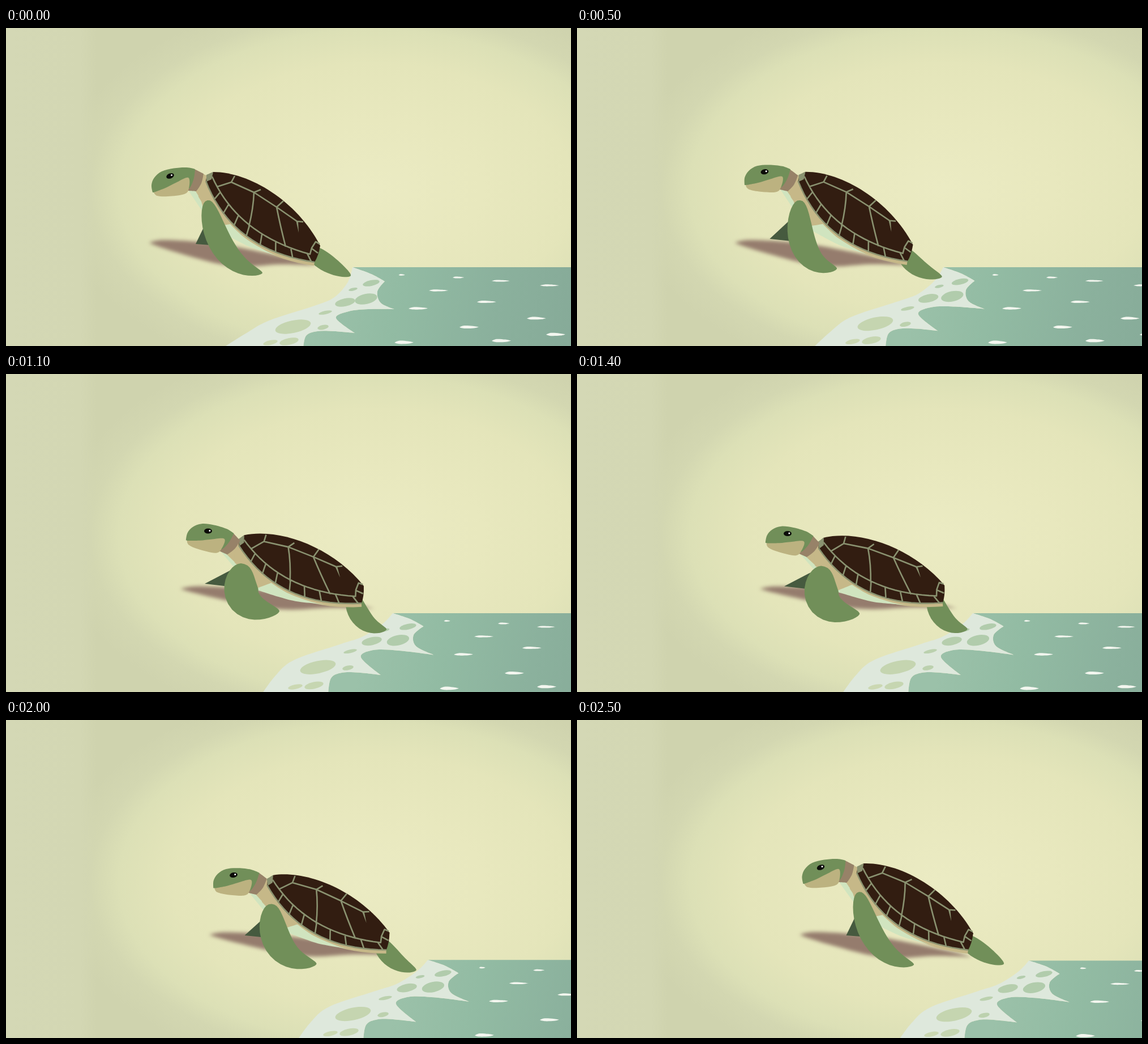
Recreate the animation shown at these times as an HTML page with a canvas. Size 998 by 561 pixels, loop 2600 ms.

```html
<!DOCTYPE html>
<html lang="en">
<head>
<meta charset="utf-8">
<title>Turtle on the beach</title>
<style>
  html, body { margin: 0; width: 100%; height: 100%; overflow: hidden; background: #d3d7b3; }
  canvas { display: block; width: 100vw; height: 100vh; }
</style>
</head>
<body>
<canvas id="stage" width="998" height="561"></canvas>
<script>
const LOOP = 2600, STEP = 100;
const ctx = document.getElementById('stage').getContext('2d');
const GREEN = '#718f59', TAN = '#c6b888', PALE = '#d0e4bf', DARK = '#321d11', SEAM = '#8a9270';

// ---- gait ----
// time, sea x, body x, body y, lean in degrees, step along POSES
const KEYS = [
  [0, 0, 367, 255, 0, 0],
  [300, 25, 392, 254, 0, 0],
  [700, 54, 414, 259, -2, 1],
  [1100, 80, 422, 285, -11.5, 2],
  [1400, 96, 437, 289.5, -13, 2],
  [2000, 142, 473, 274.5, -8.2, 2.5],
  [2500, 195, 507.5, 254, -2, 3]
];
// head: eye and tilt; far: triangle, both from the body; limbs: bend and tip from their root, half width
const PUSH = {
  head: [-77, 6, 0], arm: [18, 118, 97, 128, 21], leg: [37, 32, 77, 49, 16],
  far: [-32, 126, -17, 95, -7, 128]
};
const REACH = {
  head: [-68, -10, 22], arm: [-47, 116, 26, 111, 26], leg: [8, 58, 71, 56, 17],
  far: [-104, 106, -33, 61, -56, 112]
};
const CROUCH = {
  head: [-65, -8, 20.5], arm: [-28, 85, 62, 83, 30], leg: [10, 66, 62, 68, 18],
  far: [-71, 85, -25, 61, -28, 90]
};
const POSES = [PUSH, REACH, CROUCH, PUSH];
const NECK = [367, 255], EYE = [289, 261], SHOULDER = [356, 304], HIP = [532, 388];

// ---- helpers ----
const clamp = (v, lo = 0, hi = 1) => Math.max(lo, Math.min(hi, v));
const mix = (a, b, k) => a.map((v, i) => v + (b[i] - v) * k);
const shift = (p, dx, dy) => p.map((v, i) => v + (i % 2 ? dy : dx));
const quad = (a, c, b, u) => mix(mix(a, c, u), mix(c, b, u), u);

// Smooth curve through the key rows
function gait(t) {
  const last = KEYS.length - 1;
  let i = 0;
  while (i < last - 1 && t >= KEYS[i + 1][0]) i++;
  const a = KEYS[i], b = KEYS[i + 1], h = b[0] - a[0];
  const u = clamp((t - a[0]) / h), u2 = u * u, u3 = u2 * u;
  const slope = (j, c) => {
    const lo = KEYS[Math.max(0, j - 1)], hi = KEYS[Math.min(last, j + 1)];
    return (hi[c] - lo[c]) / (hi[0] - lo[0]) * h;
  };
  return a.map((v, c) => v * (2 * u3 - 3 * u2 + 1) + slope(i, c) * (u3 - 2 * u2 + u)
    + b[c] * (3 * u2 - 2 * u3) + slope(i + 1, c) * (u3 - u2));
}

// Move points from a rest pivot to [x, y, degrees]
function place(p, pivot, [x, y, deg]) {
  const r = deg * Math.PI / 180, c = Math.cos(r), s = Math.sin(r), out = [];
  for (let i = 0; i < p.length; i += 2) {
    const dx = p[i] - pivot[0], dy = p[i + 1] - pivot[1];
    out.push(x + dx * c - dy * s, y + dx * s + dy * c);
  }
  return out;
}
function within(pivot, [x, y, deg], paint) {
  ctx.save();
  ctx.translate(x, y);
  ctx.rotate(deg * Math.PI / 180);
  ctx.translate(-pivot[0], -pivot[1]);
  paint();
  ctx.restore();
}
function fill(color) {
  ctx.fillStyle = color;
  ctx.fill();
}
function line(p) {
  ctx.moveTo(p[0], p[1]);
  for (let i = 2; i < p.length; i += 2) ctx.lineTo(p[i], p[i + 1]);
}
function poly(p, color) {
  ctx.beginPath();
  line(p);
  fill(color);
}
// Rounded closed shape; the listed points stay sharp
function blob(p, color, sharp = []) {
  const n = p.length / 2;
  const at = (i, c) => p[2 * ((i + n) % n) + c];
  const pull = (i, c) => sharp.includes(i % n) ? 0 : (at(i + 1, c) - at(i - 1, c)) / 6;
  ctx.beginPath();
  ctx.moveTo(p[0], p[1]);
  for (let i = 0; i < n; i++) {
    ctx.bezierCurveTo(at(i, 0) + pull(i, 0), at(i, 1) + pull(i, 1),
      at(i + 1, 0) - pull(i + 1, 0), at(i + 1, 1) - pull(i + 1, 1), at(i + 1, 0), at(i + 1, 1));
  }
  fill(color);
}
function oval(x, y, rx, ry, deg, color) {
  ctx.beginPath();
  ctx.ellipse(x, y, rx, ry, deg * Math.PI / 180, 0, 7);
  fill(color);
}
function stops(g, list) {
  list.forEach(([k, c]) => g.addColorStop(k, c));
  return g;
}
// Flipper: a bent spine, broad in the middle and thin at the tip
function limb([x, y], [bx, by, tx, ty, width]) {
  const root = [x, y], bend = [x + bx, y + by], tip = [x + tx, y + ty];
  const near = [], far = [], n = 24;
  for (let i = 0; i <= n; i++) {
    const u = (1 - Math.cos(Math.PI * i / n)) / 2;
    const [px, py] = quad(root, bend, tip, u);
    const [dx, dy] = mix([bx, by], [tx - bx, ty - by], u);
    const w = width * Math.max(0, Math.sin(Math.PI * u ** .7)) ** .6 / Math.hypot(dx, dy);
    near.push(px - dy * w, py + dx * w);
    far.unshift(px + dy * w, py - dx * w);
  }
  poly([...near, ...far], GREEN);
}

// ---- beach ----
const FOAM = [612, 422, 645, 434, 669, 447, 656, 465, 662, 485, 686, 496, 640, 496, 605, 500, 583, 512,
  616, 538, 580, 535, 550, 535, 530, 543, 525, 566, 380, 566, 425, 538, 465, 516, 545, 490, 580, 475, 604, 448];
const HOLES = [[507, 527, 32, 11], [500, 553, 17, 6], [467, 555, 13, 4], [560, 528, 10, 4], [564, 502, 12, 3],
  [599, 484, 18, 7], [636, 478, 20, 9], [645, 450, 15, 5], [613, 461, 8, 2.5]];
const GLINTS = [[799, 440], [874, 446], [960, 454], [699, 435.5], [764, 463], [849, 483], [728, 494.5],
  [937, 512], [818, 527.5], [971, 540.5], [703, 554.5], [875, 551.5]];

// Foam slides back along the sand as the wave draws out
function wash(x, y, k) {
  const pull = k * clamp((x - 380) / 60) * clamp((690 - x) / 80);
  return [x - 27 * pull * clamp((y - 422) / 70), y - 13 * pull * Math.sin(Math.PI * (y - 422) / 144)];
}

function drawSky() {
  ctx.save();
  ctx.translate(648, 285);
  ctx.scale(1, .63);
  ctx.fillStyle = stops(ctx.createRadialGradient(0, 0, 0, 0, 0, 560), [[0, '#ebebc3'], [.34, '#e8e8be'],
    [.63, '#e4e5ba'], [.8, '#dce0b6'], [.89, '#d3d7b1'], [1, '#cfd3ae']]);
  ctx.fillRect(-650, -460, 1002, 905);
  ctx.restore();
  ctx.fillStyle = stops(ctx.createLinearGradient(0, 0, 160, 0),
    [[0, '#d4d8b5'], [.82, '#d3d7b3'], [1, 'rgba(211,215,179,0)']]);
  ctx.fillRect(0, 0, 160, 561);
}

function drawShore(t, sx) {
  const k = clamp(t / 900), fx = sx - 9 * k, dy = Math.max(0, t - 1400) * .0022;
  const foam = [];
  for (let i = 0; i < FOAM.length; i += 2) foam.push(...wash(FOAM[i], FOAM[i + 1], k));
  const edge = shift(foam, fx, dy);

  const paint = stops(ctx.createLinearGradient(560 + sx, 440, 1010 + sx, 540),
    [[0, '#9bc1a9'], [.3, '#92bba3'], [.65, '#8bb19d'], [1, '#86aa98']]);
  blob([...edge.slice(0, 28), 1400, 570, 1400, 422 + dy], paint, [0, 2, 5, 9, 13, 14, 15]);
  for (const [x, y] of GLINTS) {
    const w = Math.min(17, y - 430), h = 1.3 + (y - 430) * .012;
    blob(shift([-w, .2 * h, -.5 * w, -h, .4 * w, -.7 * h, w, 0, .5 * w, .8 * h, -.5 * w, h], x + sx, y + dy),
      '#f3f6ef', [0, 3]);
  }
  blob(edge, '#dee8dc', [0, 2, 5, 9, 13, 14]);
  for (const [hx, hy, rx, ry] of HOLES) {
    const [x, y] = wash(hx, hy, k), wet = clamp((hx - 460) / 170);
    const [r, g, b] = mix([204, 217, 178], [177, 204, 172], wet);
    oval(x + fx, y + dy, rx, ry, -12, `rgb(${r},${g},${b})`);
  }
}

function drawShadow(x, lean, reach) {
  const left = x - 114 - 26 * reach, width = 295 - 4.1 * lean + 26 * reach, depth = 1 + lean * .011;
  const shape = [0, 0, .08, -5, .28, -2, .5, 6, .88, 30, 1, 40, .78, 38, .57, 42, .4, 36, .2, 20, .07, 8];
  ctx.filter = 'blur(3px)';
  blob(shape.map((v, i) => i % 2 ? 379 + v * depth : left + v * width), '#957c6d', [0, 5]);
  ctx.filter = 'none';
}

// ---- turtle ----
function drawShell() {
  const rim = u => quad([353, 270], [400, 392], [545, 413], u);
  const inner = u => quad([364, 262], [410, 365], [537, 399], u);
  const trail = f => Array.from({ length: 21 }, (_, i) => f(i / 20)).flat();

  // chest, belly and the pale strip below the rim
  ctx.beginPath();
  line(trail(rim));
  ctx.lineWidth = 13;
  ctx.strokeStyle = TAN;
  ctx.stroke();
  blob([350, 258, 341, 290, 342, 312, 368, 351, 402, 360, 400, 310], TAN, [0, 3]);
  blob([365, 351, 396, 346, 423, 371, 463, 395, 490, 405, 436, 388, 406, 374], PALE, [0, 1, 4]);

  ctx.beginPath();
  ctx.moveTo(366, 254);
  ctx.bezierCurveTo(430, 254, 514, 305, 555, 384);
  ctx.quadraticCurveTo(552, 402, 545, 413);
  ctx.quadraticCurveTo(400, 392, 353, 270);
  ctx.quadraticCurveTo(354, 258, 366, 254);
  fill(DARK);

  ctx.beginPath();
  line(trail(rim));
  line([...trail(inner), 540, 388, 547, 377, 554, 381]);
  for (let u = .14; u < 1; u += .12) line([...inner(u), ...rim(u)]);
  line([540, 389, 551, 397]);

  // ridge, its spurs to the top edge and ribs to the margin
  const ridge = [[373, 280], [398, 272], [438, 290], [478, 316], [514, 341]];
  const spurs = [[6, -11], [12, -5], [12, -11], [11, 1]];
  line(ridge.flat());
  spurs.forEach(([dx, dy], i) => {
    const [x, y] = ridge[i + 1];
    line([x, y, x + dx, y + dy]);
  });
  ctx.moveTo(...ridge[2]);
  ctx.quadraticCurveTo(437, 318, 429, 350);
  ctx.moveTo(...ridge[3]);
  ctx.quadraticCurveTo(484, 347, 494, 386);
  ctx.lineWidth = 2.6;
  ctx.lineJoin = 'round';
  ctx.strokeStyle = SEAM;
  ctx.stroke();
  poly([366, 254, 354, 259, 354, 271, 363, 267], SEAM);
  poly([512, 339, 516, 341, 517, 361], SEAM);
}

function drawHead(t) {
  blob([332, 249, 348, 257, 344, 274, 335, 288, 318, 287, 328, 271], '#978268', [0, 1, 3, 4]);
  blob([258, 290, 256, 277, 261, 264, 274, 253, 295, 247.5, 318, 246, 333, 249, 330, 268, 320, 285, 295, 288],
    GREEN, [0, 6]);
  blob([260, 290, 281, 282, 299, 273, 321, 264, 322, 283, 314, 293, 285, 297, 266, 296], '#bcb280', [0]);

  const open = clamp(Math.abs(t - 300) / 200);
  if (open < .2) oval(EYE[0] - 2, EYE[1] - 3, 3.5, 1, -18, '#35452c');
  else oval(...EYE, 7, 4.5 * open, -20, '#0b0c08');
  if (open > .9) oval(EYE[0] + 2.5, EYE[1] - 1.5, 1.5, 1.5, 0, '#fff');
}

function drawTurtle(t, x, y, lean, step) {
  const i = Math.min(2, Math.floor(step));
  const part = name => mix(POSES[i][name], POSES[i + 1][name], step - i);
  const body = [x, y, lean], [hx, hy, tilt] = part('head'), head = [x + hx, y + hy, tilt];
  const onBody = p => place(p, NECK, body), onHead = p => place(p, EYE, head);

  poly(shift(part('far'), x, y), '#465a3f');
  limb(onBody(HIP), part('leg'));
  poly([...onHead([321, 286, 338, 284]), ...onBody([354, 300, 356, 338, 346, 322])], PALE);
  poly([...onHead([346, 257, 334, 288]), ...onBody([346, 306, 366, 300, 354, 260])], TAN);
  within(NECK, body, drawShell);
  poly([...onHead([321, 286, 333, 288]), ...onBody([345, 306, 354, 338, 345, 320])], PALE);
  within(EYE, head, () => drawHead(t));
  limb(onBody(SHOULDER), part('arm'));
}

function draw(t) {
  const [, sea, x, y, lean, s] = gait(t), step = clamp(s, 0, 3);
  drawSky();
  drawShore(t, sea);
  drawShadow(x, lean, clamp(1 - Math.abs(step - 1)));
  drawTurtle(t, x, y, lean, step);
}

const start = performance.now();
function tick() {
  const t = (performance.now() - start) % LOOP;
  draw(Math.floor(t / STEP) * STEP);
  requestAnimationFrame(tick);
}
tick();
</script>
</body>
</html>
```
